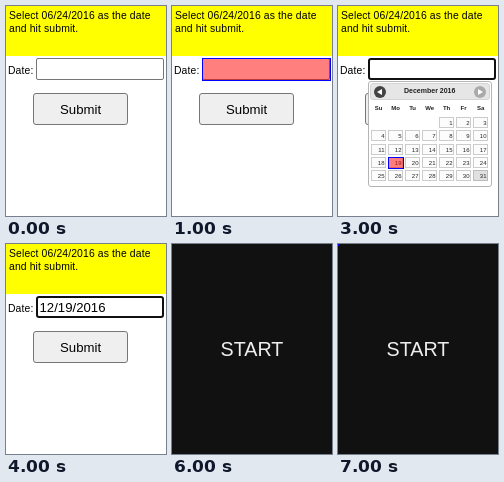
An HTML page that plays this animation: 160 px wide and 210 px high, repeating every 8 s.

```html
<!DOCTYPE html>
<html lang="en">
<head>
<meta charset="utf-8">
<title>Date picker</title>
<style>
  html, body { margin: 0; width: 100%; height: 100%; overflow: hidden; background: #fff; }
  svg { display: block; font-family: "Liberation Sans", Arial, sans-serif; }
  .body { font-size: 10.4px; letter-spacing: .12px; }
  .control { font-size: 13.2px; }
  .title { font: bold 7px "Liberation Sans", Arial, sans-serif; fill: #222; }
  .weekday { font: bold 6px "Liberation Sans", Arial, sans-serif; fill: #222; text-anchor: middle; }
  .day { font-size: 6px; fill: #222; text-anchor: end; }
  .mark { fill: rgba(255, 0, 0, .5); stroke: #00f; }
</style>
</head>
<body>
<svg width="160" height="210">
  <rect width="160" height="50" fill="#ff0"/>
  <g class="body">
    <text x="3" y="13">Select 06/24/2016 as the date</text>
    <text x="3" y="26">and hit submit.</text>
    <text x="2" y="68">Date:</text>
  </g>
  <rect x="27.5" y="87.5" width="94" height="31" rx="2.5" fill="#efefef" stroke="#767676"/>
  <text class="control" x="54" y="108">Submit</text>

  <rect data-on="01" x="30.5" y="52.5" width="127" height="21" rx="1.5" fill="#fff" stroke="#767676"/>
  <rect data-on="1" class="mark" x="30.5" y="52.5" width="128" height="22"/>
  <rect data-on="2345" x="31" y="53" width="126" height="20" rx="2" fill="#fff" stroke="#101010" stroke-width="2"/>
  <text data-on="45" class="control" x="33.5" y="68">12/19/2016</text>

  <g data-on="23">
    <rect x="30.5" y="75.5" width="123" height="105" rx="2.5" fill="#fff" stroke="#b4b4b4"/>
    <rect x="32.5" y="77.5" width="119" height="16" rx="2.5" fill="#e6e6e6" stroke="#d4d4d4"/>
    <circle cx="42" cy="86" r="6" fill="#444"/>
    <path d="M44 83v6l-5-3z" fill="#fff"/>
    <circle cx="142" cy="86" r="6" fill="#aaa"/>
    <path d="M140 83v6l5-3z" fill="#fff"/>
    <text class="title" x="66" y="87">December 2016</text>
    <g id="days"></g>
  </g>
  <rect data-on="3" class="mark" x="50.5" y="151.5" width="15" height="11"/>

  <g data-on="67">
    <rect width="160" height="210" fill="#111"/>
    <text x="48.6" y="111.5" font-size="19.7" fill="#eee">START</text>
  </g>
  <rect data-on="57" width="1" height="2" fill="#00f"/>
</svg>
<script>
  const FIRST_WEEKDAY = 4, DAYS = 31, COLUMN = 17, ROW = 13.35;
  let cells = ['Su', 'Mo', 'Tu', 'We', 'Th', 'Fr', 'Sa']
    .map((name, i) => `<text class="weekday" x="${40.6 + i * COLUMN}" y="104">${name}</text>`).join('');

  for (let day = 1; day <= DAYS; day++) {
    const slot = day + FIRST_WEEKDAY - 1;
    const x = 33 + slot % 7 * COLUMN;
    const y = Math.round(111 + Math.floor(slot / 7) * ROW);
    const [fill, stroke] = day === DAYS ? ['#e0e0e0', '#bbb'] : ['#fcfcfc', '#ccc'];
    cells += `<rect x="${x + .5}" y="${y + .5}" width="14" height="10" fill="${fill}" stroke="${stroke}"/>
      <text class="day" x="${x + 13.5}" y="${y + 8}">${day}</text>`;
  }
  document.getElementById('days').innerHTML = cells;

  const parts = document.querySelectorAll('[data-on]');
  function draw() {
    const second = Math.floor(performance.now() / 1000) % 8;
    for (const part of parts)
      part.style.display = part.dataset.on.includes(second) ? '' : 'none';
    requestAnimationFrame(draw);
  }
  draw();
</script>
</body>
</html>
```
